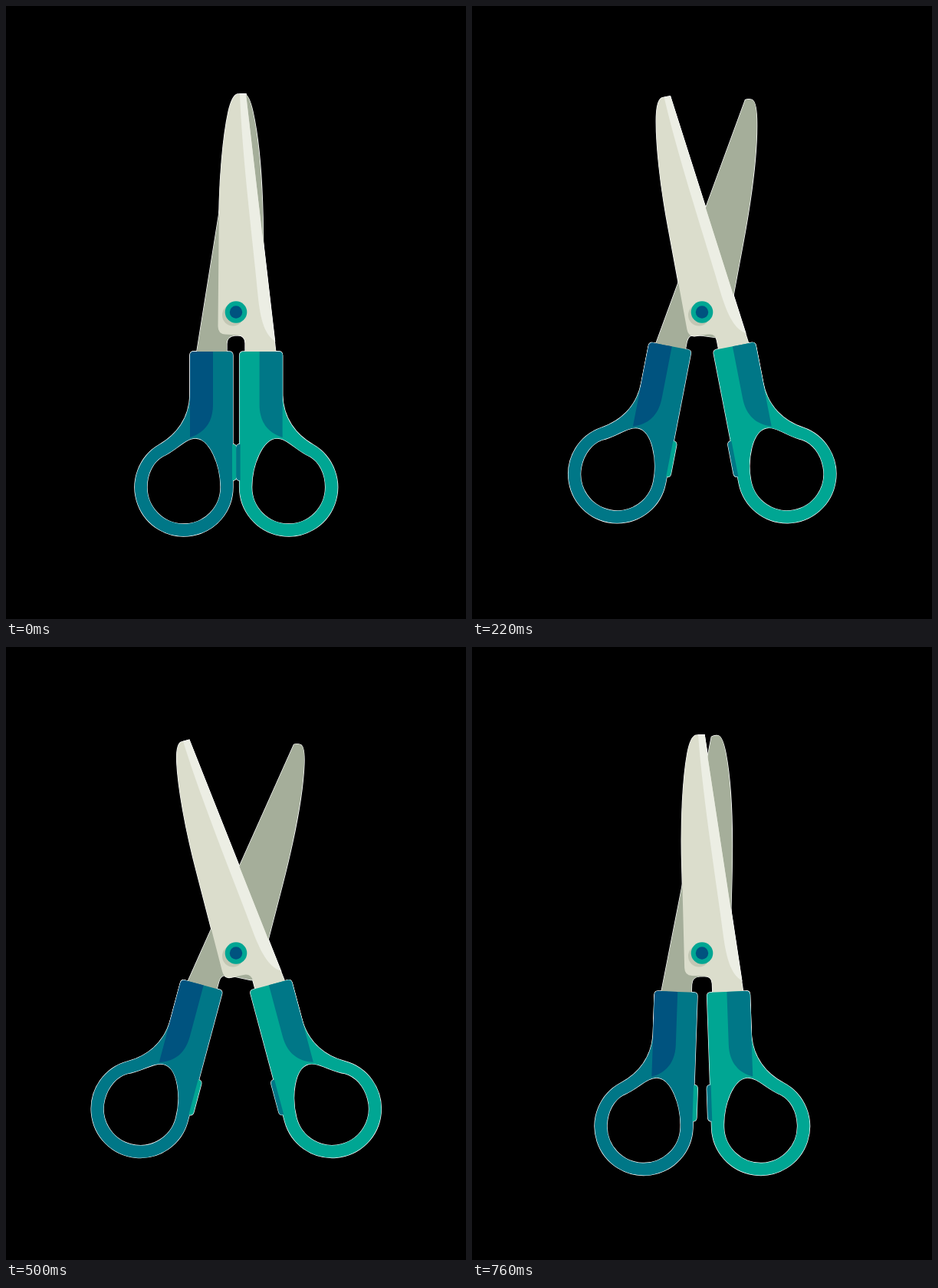
An HTML page for the animation above (780 ms loop, 600 by 800 pixels).

```html
<!DOCTYPE html>
<html lang="en">
<head>
<meta charset="utf-8">
<title>Scissors</title>
<style>
  html, body { margin: 0; width: 100%; height: 100%; overflow: hidden; background: #000; }
  svg { display: block; width: 600px; height: 800px; }
  .halo { stroke: #fff; stroke-width: 1.3; }
  .left { --body: #007787; --grip: #00537f; --tab: #00a693; }
  .right { --body: #00a693; --grip: #007787; --tab: #007787; }
</style>
</head>
<body>
<svg viewBox="0 0 600 800">
  <defs>
    <g id="handle">
      <path fill="var(--body)" fill-rule="evenodd" d="M245 451H291q5 0 5 5V628A64 64 0 1 1 200 572.6C222 560 240 538 240 505V456q0-5 5-5Z
        M184 628A48 48 0 0 0 280 628C280 600 266 564 247 564C234 564 222 580 204 588C192 595 184 610 184 628Z"/>
      <path fill="var(--grip)" d="M245 451H270V520C270 543 259 557 240 563V456q0-5 5-5Z"/>
      <path fill="var(--tab)" d="M295 572H297.500Q300.500 573 300.500 577V614Q300.500 618 297.500 619H295Z"/>
    </g>
  </defs>

  <!-- Pale rim around the whole silhouette -->
  <g class="halo">
    <use href="#back"/>
    <use href="#front"/>
  </g>

  <g id="back">
    <path fill="#a5ae9a" d="M302.500 117Q306 114.500 311 115C316 116 319 125 322 138C331 178 335 240 335.500 300L336.500 418Q336 428 326 428.500L298 430Q288 431 288 441V455H248.200Z"/>
    <use href="#handle" class="left"/>
  </g>

  <g id="front">
    <path fill="#dbddcc" d="M302 115H313L352.300 455H312V440Q312 430 302 429.500L286 428.500Q276.500 428 276.500 418L277.700 285C278 225 283 170 290 138C293 125 297 116 302 115Z"/>
    <path fill="#eceee4" d="M305 115H313L350.500 437C336 428 331 405 328 372C325 335 308 200 305 115Z"/>
    <use href="#handle" class="right" transform="matrix(-1 0 0 1 600.600 0)"/>
  </g>

  <circle cx="296" cy="403.500" r="14" fill="#c3c7b4"/>
  <circle cx="300" cy="399.500" r="14.300" fill="#00a693"/>
  <circle cx="300" cy="399.500" r="8.200" fill="#00537f"/>
</svg>
<script>
  const STEP = 20, STEPS = 39, PEAK = 20;
  const back = document.getElementById('back');
  const front = document.getElementById('front');

  function turn(part, degrees) {
    part.setAttribute('transform', `rotate(${degrees} 300 399.5)`);
  }

  // One degree per step: open to the peak, then close again.
  function draw(now) {
    const step = Math.floor(now / STEP) % STEPS;
    const angle = PEAK - Math.abs(step - PEAK);
    turn(back, angle);
    turn(front, -angle);
  }

  function tick() {
    draw(performance.now());
    requestAnimationFrame(tick);
  }
  tick();
</script>
</body>
</html>
```
